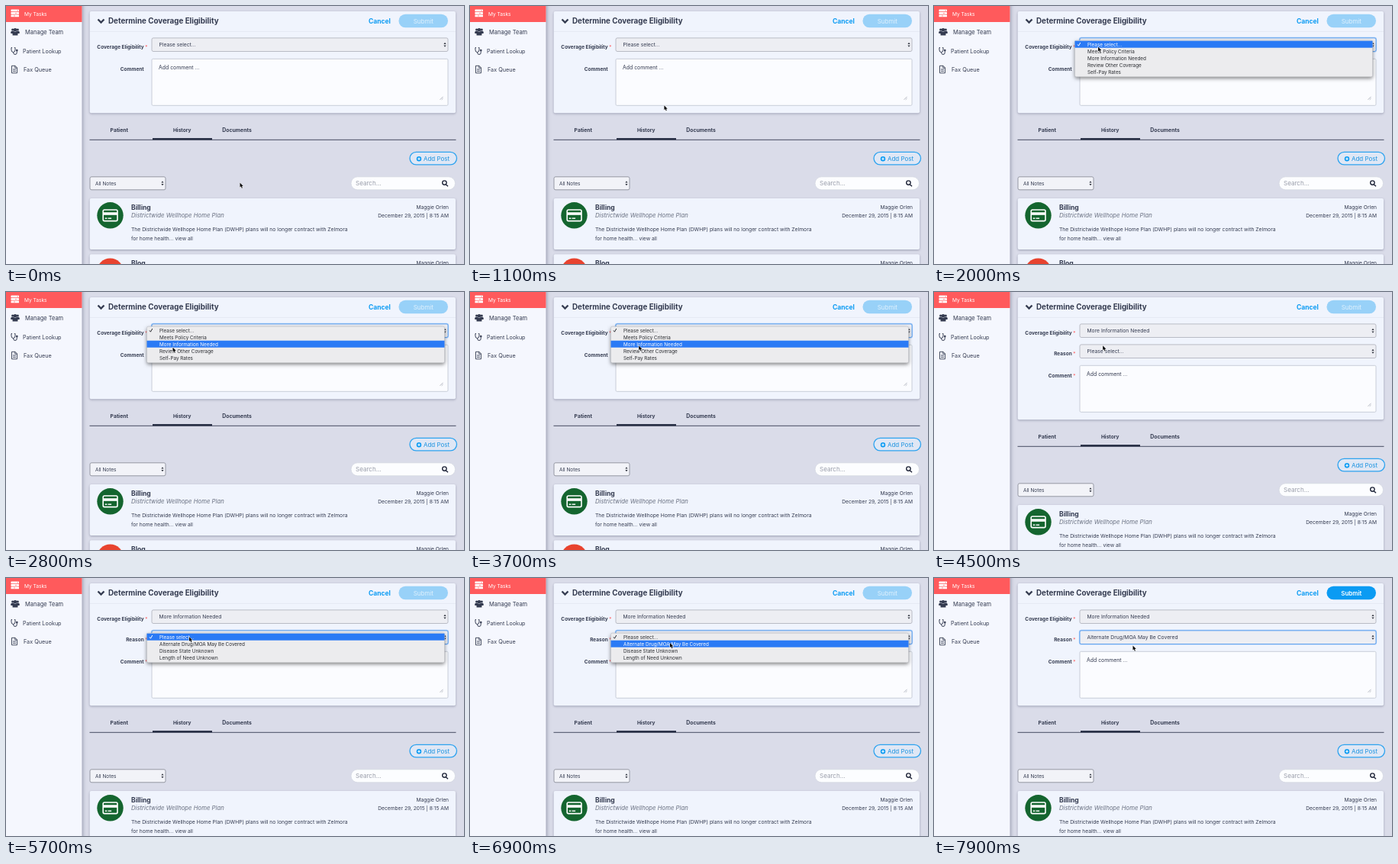
Recreate the animation shown at these times as an HTML page with a canvas. Size 600 by 338 pixels, loop 8000 ms.

```html
<!DOCTYPE html>
<html lang="en">
<head>
<meta charset="utf-8">
<title>Coverage eligibility form</title>
<style>
  html, body { margin: 0; width: 100%; height: 100%; overflow: hidden; background: #dadce9; }
  canvas { display: block; width: 600px; height: 338px; }
</style>
</head>
<body>
<canvas id="stage"></canvas>
<script>
const W = 600, H = 338, LOOP = 8000;
const canvas = document.getElementById('stage');
const ctx = canvas.getContext('2d');
const ratio = window.devicePixelRatio || 1;
canvas.width = W * ratio;
canvas.height = H * ratio;

const INK = '#343b50', BLUE = '#0b9bf3', CARD = '#f0f4fd', RED = '#ff5a5c';
const TIMES = { openFirst: 1800, pickFirst: 4200, openSecond: 5600, pickSecond: 7300 };
const ELIGIBILITY = ['Please select...', 'Meets Policy Criteria', 'More Information Needed',
  'Review Other Coverage', 'Self-Pay Rates'];
const REASONS = ['Please select...', 'Alternate Drug/MOA May Be Covered',
  'Disease State Unknown', 'Length of Need Unknown'];

// Pointer stops: time, x, y
const PATH = [
  [500, 306.5, 231.5], [1600, 215, 53.5], [2050, 215, 53.5], [2700, 218.5, 72.4],
  [3000, 218.5, 72.4], [3500, 221.2, 70.2], [4800, 221.2, 70.2], [5400, 240, 77],
  [5800, 240, 77], [6500, 262, 85], [7000, 262, 85], [7600, 260.5, 88.5]
];

function pointerAt(t) {
  if (t <= PATH[0][0]) return PATH[0].slice(1);
  for (let i = 1; i < PATH.length; i++) {
    const [t0, x0, y0] = PATH[i - 1], [t1, x1, y1] = PATH[i];
    if (t < t1) {
      const p = (t - t0) / (t1 - t0), e = p * p * (3 - 2 * p);
      return [x0 + (x1 - x0) * e, y0 + (y1 - y0) * e];
    }
  }
  return PATH[PATH.length - 1].slice(1);
}

function text(str, x, y, size, { color = INK, weight = 400, align = 'left', style = 'normal' } = {}) {
  ctx.font = `${style} ${weight} ${size}px Inter, sans-serif`;
  ctx.textAlign = align;
  ctx.fillStyle = color;
  ctx.fillText(str, x, y);
}

function box(x, y, w, h, r, fill, stroke, line = 1) {
  ctx.beginPath();
  ctx.roundRect(x, y, w, h, r);
  if (fill) { ctx.fillStyle = fill; ctx.fill(); }
  if (stroke) { ctx.strokeStyle = stroke; ctx.lineWidth = line; ctx.stroke(); }
}

function dot(x, y, r, fill) {
  ctx.beginPath();
  ctx.arc(x, y, r, 0, Math.PI * 2);
  ctx.fillStyle = fill;
  ctx.fill();
}

function stroke(d, color, line) {
  ctx.strokeStyle = color;
  ctx.lineWidth = line;
  ctx.stroke(new Path2D(d));
}

function fillPath(d, color) {
  ctx.fillStyle = color;
  ctx.fill(new Path2D(d));
}

function shadowed(color, blur, dy, draw) {
  ctx.save();
  ctx.shadowColor = color;
  ctx.shadowBlur = blur * ratio;
  ctx.shadowOffsetY = dy * ratio;
  draw();
  ctx.restore();
}

function card(y, h) {
  shadowed('rgba(60,65,95,.4)', 3, 1, () => box(109.7, y, 479.3, h, 2, CARD));
}

function sidebar() {
  shadowed('rgba(60,65,95,.55)', 5, 0, () => {
    ctx.fillStyle = '#f5f7fe';
    ctx.fillRect(-10, -10, 109.5, H + 20);
  });
  ctx.fillStyle = RED;
  ctx.fillRect(0, 0, 99.5, 21);

  for (let i = 0; i < 3; i++) {
    box(6.5, 4.6 + i * 3.5, 10.5, 2.6, .5, '#fff');
    dot(15 - i * 2, 5.9 + i * 3.5, .6, RED);
  }
  text('My Tasks', 24, 12.6, 6.6, { color: '#fff' });

  for (const [x, y, r] of [[8.7, 31, 1.6], [15.3, 31, 1.6], [12, 31.3, 2.3]]) {
    dot(x, y, r, INK);
    box(x - r * 1.5, y + r + .2, r * 3, r * 2, [r, r, .5, .5], INK);
  }
  text('Manage Team', 25, 37.2, 7.5);

  stroke('M8 54.5H7V57.5Q7 60.5 9.5 60.5T12 57.5V54.5H11M9.5 60.5Q9.5 63.5 12 63.5T14.3 60.5V59', INK, 1);
  dot(14.3, 58.1, 1.3, INK);
  text('Patient Lookup', 22, 61.7, 7.15);

  stroke('M7.5 78.3H12L14.5 80.8V87.8H7.5ZM11.8 78.3V81.1H14.5M9 83H13M9 85.3H13', INK, .9);
  text('Fax Queue', 23, 86.2, 7.25);
}

function arrows(x, y) {
  fillPath(`M${x - 1.6} ${y - .7}L${x} ${y - 3}L${x + 1.6} ${y - .7}ZM${x - 1.6} ${y + .7}L${x} ${y + 3}L${x + 1.6} ${y + .7}Z`, '#30343f');
}

function select(x, y, w, h, label, size, { focused = false, fill = '#edeef3', border = '#b4b6c0' } = {}) {
  if (focused) box(x, y, w, h, 2, null, 'rgba(95,165,245,.55)', 2.2);
  box(x, y, w, h, 2, fill, focused ? '#5b9fee' : border, .9);
  text(label, x + (w > 200 ? 9.5 : 7), y + h / 2 + 2.3, size);
  arrows(x + w - 4, y + h / 2);
}

function label(str, y, required) {
  text(str, 180.7, y, 6.5, { weight: 700, align: 'right' });
  if (required) text('*', 182.3, y, 6.5, { color: RED });
}

function form(s) {
  const areaY = s.reason ? 96.3 : 69.3;
  card(7, s.reason ? 160.3 : 133.3);
  ctx.fillStyle = '#e3e7f1';
  ctx.fillRect(110, 33, 479, .7);

  stroke('M120.5 17.5L124.5 21.5L128.5 17.5', INK, 2.3);
  text('Determine Coverage Eligibility', 134, 23, 9.8, { weight: 700 });
  text('Cancel', 475, 22.9, 8.5, { weight: 700, color: BLUE });
  box(514.5, 10.8, 64.5, 17.5, 8.75, s.ready ? BLUE : '#98d1f8');
  text('Submit', 546.8, 22.6, 8, {
    align: 'center', weight: s.ready ? 600 : 400, color: s.ready ? '#fff' : '#e0f1fd'
  });

  label('Coverage Eligibility', 56.2, true);
  select(191, 41.9, 388, 17.6, s.reason ? ELIGIBILITY[2] : ELIGIBILITY[0], 6.75, { focused: s.menu === 1 });
  if (s.reason) {
    label('Reason', 83.2, true);
    select(191, 68.9, 388, 17.6, s.ready ? REASONS[1] : REASONS[0], 6.75, { focused: s.menu === 2 || s.ready });
  }
  label('Comment', areaY + 15.9, s.reason);
  box(191, areaY, 388, 61, 1.5, '#fbfcff', '#c3c9d4', .9);
  text('Add comment ...', 200, areaY + 13.5, 6.9);
  stroke(`M568.5 ${areaY + 53.5}l4 -4M570.7 ${areaY + 53.5}l1.8 -1.8`, '#999da8', .7);
}

function post(y, title, color) {
  card(y, 67);
  dot(136.5, y + 22.3, 17.2, color);
  text(title, 164, y + 14.7, 8.6, { weight: 700 });
  text('Maggie Orlen', 580, y + 13.7, 6.7, { align: 'right' });
}

function history() {
  text('Patient', 148.3, 165.2, 6.8, { weight: 700, align: 'center' });
  text('History', 230.7, 165.2, 6.6, { weight: 700, align: 'center' });
  text('Documents', 302.5, 165.2, 6.9, { weight: 700, align: 'center' });
  ctx.fillStyle = '#454b60';
  ctx.fillRect(109.5, 174.8, 480, 1);
  ctx.fillStyle = '#2b3248';
  ctx.fillRect(192, 173, 78, 2.4);

  box(529, 191.3, 61.5, 16.6, 8.3, '#dfe7f5', '#2ea3ef', 1.3);
  dot(541, 200.2, 3.2, BLUE);
  stroke('M539.2 200.2H542.8M541 198.4V202', '#fff', 1);
  text('Add Post', 547, 203, 7.95, { color: '#1b93e0' });

  select(110, 223.8, 99, 17, 'All Notes', 6.5, { fill: '#f2f3f8', border: '#8d909b' });
  box(452, 223.8, 136.5, 17, 8.5, '#fcfdff', '#d0d4df', .7);
  text('Search...', 458, 235.3, 8.05, { color: '#9a9eaa' });
  stroke('M577.1 231.6a2.7 2.7 0 1 1 -5.4 0a2.7 2.7 0 1 1 5.4 0M576.3 233.7L579 236.3', '#20263a', 1.4);

  post(252, 'Billing', '#14652f');
  box(127.2, 267, 18.8, 14.6, 1.8, null, '#fff', 1.6);
  ctx.fillStyle = '#fff';
  ctx.fillRect(127, 270.3, 19, 3.5);
  ctx.fillRect(129.7, 277.5, 2.7, 1.4);
  ctx.fillRect(133.6, 277.5, 4.5, 1.4);
  text('Districtwide Wellhope Home Plan', 164, 277.4, 7.75, { style: 'italic', color: '#697080' });
  text('The Districtwide Wellhope Home Plan (DWHP) plans will no longer contract with Zelmora', 164, 295, 6.77);
  text('for home health... view all', 164, 306.5, 6.7);
  text('December 29, 2015 | 8:15 AM', 580, 277.4, 6.7, { align: 'right' });

  post(325.3, 'Blog', '#e8432f');
}

function menu(y, items, active) {
  const row = 9, height = items.length * row + 2.6;
  shadowed('rgba(0,0,0,.5)', 5, 2, () => box(184.5, y, 390, height, 2, '#ececee'));
  box(184.5, y, 390, height, 2, null, '#b9bac0', .5);
  items.forEach((item, i) => {
    const top = y + .5 + i * row, on = i === active, color = on ? '#fff' : '#292b30';
    if (on) {
      ctx.fillStyle = '#2a7af5';
      ctx.fillRect(184.5, top, 390, row);
    }
    if (i === 0) stroke(`M188 ${top + 4.7}l1.4 1.8l2.4 -4.2`, color, 1);
    text(item, 201, top + 6.8, 6.35, { color });
  });
}

function pointer(x, y) {
  ctx.save();
  ctx.translate(x, y);
  ctx.scale(.9, .9);
  ctx.lineJoin = 'round';
  const arrow = 'M0 0V6.8L1.5 5.4L2.6 8L3.8 7.5L2.7 5H4.8Z';
  stroke(arrow, '#fff', 1.1);
  fillPath(arrow, '#08090c');
  ctx.restore();
}

function draw(t) {
  const [px, py] = pointerAt(t);
  const reason = t >= TIMES.pickFirst;
  const ready = t >= TIMES.pickSecond;
  const first = t >= TIMES.openFirst && !reason;
  const second = t >= TIMES.openSecond && !ready;
  const state = { reason, ready, menu: first ? 1 : second ? 2 : 0 };

  ctx.setTransform(ratio, 0, 0, ratio, 0, 0);
  ctx.fillStyle = '#dadce9';
  ctx.fillRect(0, 0, W, H);

  ctx.save();
  ctx.translate(0, reason ? 27 : 0);
  history();
  ctx.restore();
  form(state);
  sidebar();

  const rowAt = top => Math.max(0, Math.floor((py - top) / 9));
  if (first) menu(45.2, ELIGIBILITY, rowAt(45.7));
  if (second) menu(72.2, REASONS, rowAt(72.7));
  pointer(px, py);
}

const start = performance.now();
function frame() {
  draw((performance.now() - start) % LOOP);
  requestAnimationFrame(frame);
}
frame();
</script>
</body>
</html>
```
